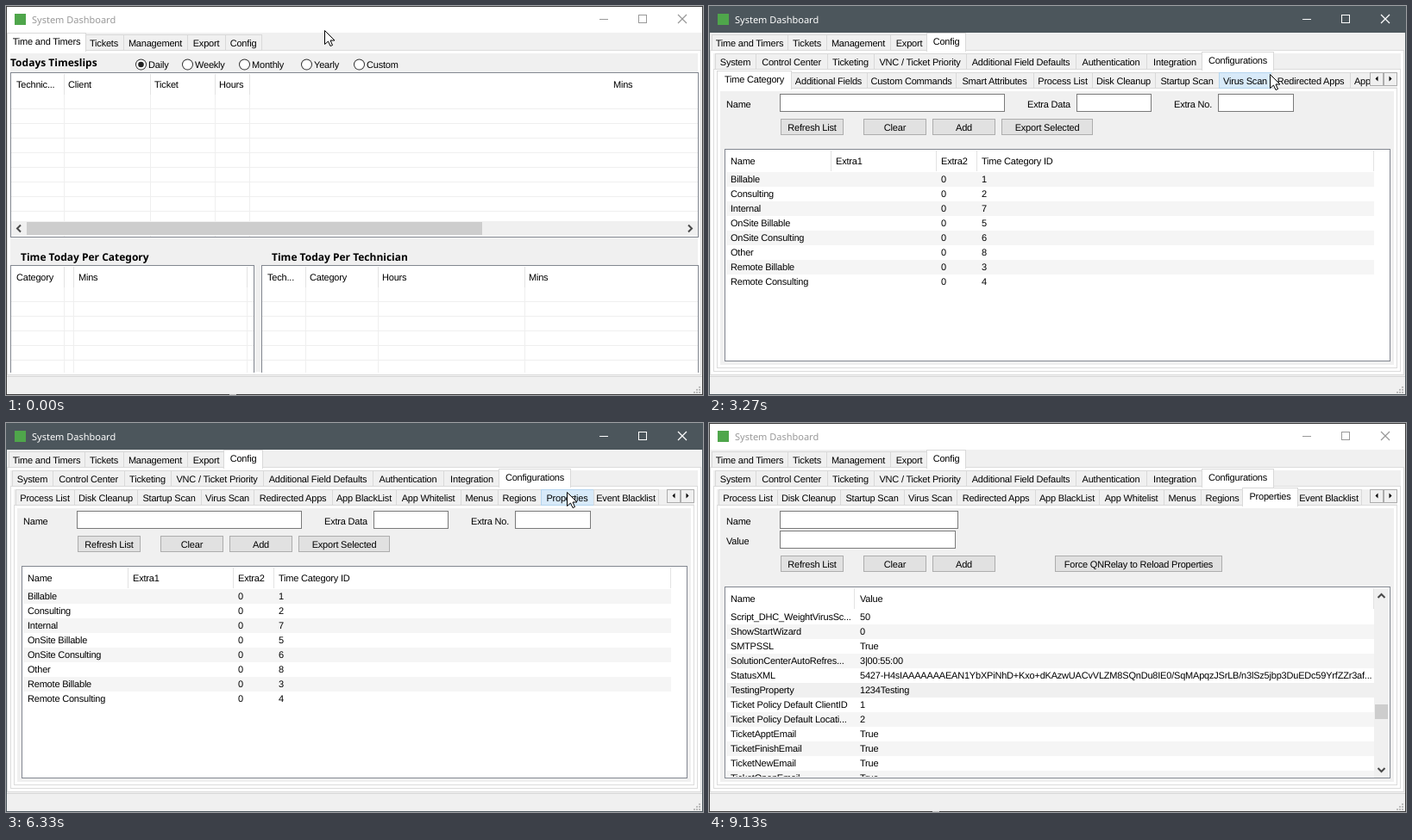
Write an HTML page with a canvas that moves like this. It is 808 px wide and 452 px high and loops after 9270 ms.

```html
<!DOCTYPE html>
<html lang="en">
<head>
<meta charset="utf-8">
<title>System Dashboard</title>
<style>
html, body { margin: 0; width: 100%; height: 100%; overflow: hidden; background: #f0f0f0; }
canvas { display: block; }
</style>
</head>
<body>
<canvas id="stage" width="808" height="452"></canvas>
<script>
const c = document.getElementById('stage').getContext('2d');
const LOOP = 9270, TICK = 200 / 3;
const FACE = '#f0f0f0', LINE = '#dcdcdc', FIELD = '#7a7a7a', LIST = '#828790';
const UI = '11px "Liberation Sans", Arial, sans-serif';
const HEAD = 'bold 12px "Noto Sans", sans-serif';
const GROUP = 'bold 13px "Liberation Sans", Arial, sans-serif';

// Pointer path: time, x, y
const PATH = [
  [0, 369, 28], [333, 279, 39], [1800, 279, 39], [2133, 550, 62], [2333, 615, 69],
  [3200, 615, 69], [3267, 650, 79], [3533, 765, 101], [3667, 765, 101], [3867, 762, 91],
  [4067, 790, 87], [5733, 790, 87], [6333, 650, 80], [7867, 650, 80], [7933, 586, 115],
  [8333, 330, 265], [8800, 86, 453]
];
const SCROLLS = [4333, 4667, 5000, 5333];

const MAIN = { y: 33, x: 3, names: ['Time and Timers', 'Tickets', 'Management', 'Export', 'Config'], w: [88, 45, 74, 44, 42] };
const SUB = {
  y: 55, x: 7,
  names: ['System', 'Control Center', 'Ticketing', 'VNC / Ticket Priority', 'Additional Field Defaults',
    'Authentication', 'Integration', 'Configurations'],
  w: [47, 83, 54, 107, 127, 82, 66, 80]
};
const CONF = {
  y: 77, x: 11,
  names: ['Time Category', 'Additional Fields', 'Custom Commands', 'Smart Attributes', 'Process List', 'Disk Cleanup',
    'Startup Scan', 'Virus Scan', 'Redirected Apps', 'App BlackList', 'App Whitelist', 'Menus', 'Regions',
    'Properties', 'Event Blacklist'],
  w: [83, 89, 103, 90, 68, 73, 74, 61, 91, 74, 75, 43, 50, 61, 75]
};
const CATEGORIES = [['Billable', 1], ['Consulting', 2], ['Internal', 7], ['OnSite Billable', 5],
  ['OnSite Consulting', 6], ['Other', 8], ['Remote Billable', 3], ['Remote Consulting', 4]];
const PROPS = [
  ['Script_DHC_WeightVirusSc...', '50'], ['ShowStartWizard', '0'], ['SMTPSSL', 'True'],
  ['SolutionCenterAutoRefres...', '3|00:55:00'],
  ['StatusXML', '5427-H4sIAAAAAAAEAN1YbXPiNhD+Kxo+dKAzwUACvVLZM8SQnDu8tIE0/SqMApqzJSrLB/n3lSz5jbp3DuEDc59YrfZZr3af...'],
  ['TestingProperty', '1234Testing'], ['Ticket Policy Default ClientID', '1'], ['Ticket Policy Default Locati...', '2'],
  ['TicketApptEmail', 'True'], ['TicketFinishEmail', 'True'], ['TicketNewEmail', 'True'], ['TicketOpenEmail', 'True']
];
PROPS[4][1] = '5427-H4sIAAAAAAAEAN1YbXPiNhD+Kxo+dKAzwUACvVLZM8SQnDu8tIE0/SqMApqzJSrLB/n3lSz5jbp3DuEDc59YrfZZr3af...'
  .slice(0, 53) + 'IE0/SqMApqzJSrLB/n3lSz5jbp3DuEDc59YrfZZr3af...';
// Label and checked state
const OPTIONS = [['Show Prompt for Zumline', 0], ['Auto Issue Zumline on Window Open', 1], ['Show Passwords', 0],
  ['Show Tool Tips', 0], ['Open ticket window on manual ticket creation', 1], ['Display save warnings when closing tickets', 1],
  ['Allow Save Password', 1], ['Do Not AutoUpdate', 0], ['Skip Web Checkup', 0], ['Reverse the save on close message', 1],
  ['Disable Timezone compensation in control center', 0], ['Use Server address for redirector', 1]];
const SWATCHES = [[138, '#4da6ff', 'Informational'], [163, '#80ff80', 'Warning'], [187, '#ff8080', 'Error'],
  [212, '#ffb366', 'Critical'], [265, '#33cc33', 'Monitor Success'], [291, '#ffb366', 'Monitor Warning'],
  [316, '#ff7373', 'Monitor Failure'], [368, '#ff4d4d', 'Ticket Overdue'], [394, '#ff4d4d', 'High Priority']];

let mouse = [0, 0];

function fill(l, t, r, b, color) {
  c.fillStyle = color;
  c.fillRect(l, t, r - l, b - t);
}
function box(l, t, r, b, inside, edge) {
  fill(l, t, r, b, edge);
  fill(l + 1, t + 1, r - 1, b - 1, inside);
}
function text(s, x, mid, { font = UI, color = '#000', align = 'left' } = {}) {
  c.font = font;
  c.letterSpacing = font === UI ? '-0.2px' : '0px';
  c.textAlign = align;
  c.fillStyle = color;
  c.fillText(s, x, mid + 4);
}
function stroke(points, color, width = 1) {
  c.beginPath();
  points.forEach(([x, y]) => c.lineTo(x, y));
  c.strokeStyle = color;
  c.lineWidth = width;
  c.stroke();
}
function disc(x, y, r, color) {
  c.beginPath();
  c.arc(x, y, r, 0, 7);
  c.fillStyle = color;
  c.fill();
}
function clipped(l, t, r, b, draw) {
  c.save();
  c.beginPath();
  c.rect(l, t, r - l, b - t);
  c.clip();
  draw();
  c.restore();
}
const over = (l, t, r, b) => mouse[0] >= l && mouse[0] < r && mouse[1] >= t && mouse[1] < b;

function page(l, t, r, b) {
  box(l, t, r, b, '#fff', LINE);
  fill(l + 4, t + 4, r - 4, b - 4, FACE);
}
function tabs({ x, y, names, w }, selected, first = 0, limit = 804) {
  clipped(0, y - 2, limit, y + 20, () => {
    let chosen = null;
    for (let i = first; i < names.length; i++) {
      const r = x + w[i];
      if (i === selected) chosen = [x, r, names[i]];
      else {
        const hot = over(x, y, Math.min(r, limit), y + 18);
        box(x, y, r + 1, y + 19, hot ? '#d8eaf9' : FACE, hot ? '#b5d5ee' : '#d9d9d9');
        text(names[i], (x + r) / 2, y + 10, { align: 'center' });
      }
      x = r;
    }
    if (chosen) {
      const [l, r, name] = chosen;
      box(l - 2, y - 2, r + 2, y + 20, '#fff', '#d9d9d9');
      fill(l - 1, y + 18, r + 1, y + 20, '#fff');
      text(name, (l + r) / 2, y + 8, { align: 'center' });
    }
  });
}
function button(s, l, t, r, b) {
  const hot = over(l, t, r, b);
  box(l, t, r, b, hot ? '#e5f1fb' : '#e1e1e1', hot ? '#0078d7' : '#adadad');
  text(s, (l + r) / 2, Math.ceil((t + b) / 2), { align: 'center' });
}
const field = (l, t, r, b) => box(l, t, r, b, '#fff', FIELD);

function chevron(x, y, dx, dy) {
  stroke([[x - 2 * dx - 4 * dy, y - 2 * dy - 4 * dx], [x + 2 * dx, y + 2 * dy],
    [x - 2 * dx + 4 * dy, y - 2 * dy + 4 * dx]], '#484848', 2);
}
function vScroll(l, t, b, top, end) {
  fill(l, t, l + 17, b, FACE);
  fill(l + 1, top, l + 16, end, '#cdcdcd');
  chevron(l + 8.5, t + 9, 0, -1);
  chevron(l + 8.5, b - 9, 0, 1);
}
function columns(cols, t) {
  for (const [s, x, sep] of cols) {
    if (s) text(s, x, t + 14);
    if (sep) fill(sep, t + 2, sep + 1, t + 26, '#e3e3e3');
  }
}
function emptyList(l, t, r, b, cols) {
  box(l, t, r, b, '#fff', LIST);
  clipped(l + 1, t + 1, r - 1, b - 1, () => {
    for (let y = t + 42; y < b; y += 17) fill(l + 1, y, r - 1, y + 1, '#efefef');
    for (const [, , sep] of cols) if (sep) fill(sep, t + 26, sep + 1, b, '#efefef');
    columns(cols, t);
  });
}
function striped(t, rows, shaded, cols, xs, selected = -1) {
  box(18, t, 790, 413, '#fff', LIST);
  columns(cols, t);
  clipped(19, t + 1, 789, 411, () => rows.forEach((row, i) => {
    const y = t + 35 + i * 17;
    if (i % 2 === shaded) fill(20, y - 8, 771, y + 9, i === selected ? FACE : '#f5f5f5');
    row.forEach((s, k) => text(s, xs[k], y));
  }));
}

function timePage() {
  text('Todays Timeslips', 5, 66, { font: HEAD });
  [['Daily', 156], ['Weekly', 210], ['Monthly', 276], ['Yearly', 348], ['Custom', 409]].forEach(([s, x], i) => {
    disc(x + .5, 68, 6.5, '#333');
    disc(x + .5, 68, 5.5, '#fff');
    if (!i) disc(x + .5, 68, 3.3, '#222');
    text(s, x + 9, 68);
  });
  emptyList(5, 77, 803, 269, [['Technic...', 12, 67], ['Client', 72, 167], ['Ticket', 172, 242], ['Hours', 247, 282], ['Mins', 704]]);
  fill(6, 250, 802, 267, FACE);
  fill(24, 251, 552, 266, '#cdcdcd');
  chevron(15, 258.5, -1, 0);
  chevron(793, 258.5, 1, 0);
  text('Time Today Per Category', 17, 292, { font: HEAD });
  text('Time Today Per Technician', 308, 292, { font: HEAD });
  clipped(0, 290, 808, 426, () => {
    emptyList(5, 301, 288, 440, [['Category', 12, 67], ['', 0, 78], ['Mins', 84, 279]]);
    emptyList(296, 301, 803, 440, [['Tech...', 303, 347], ['Category', 352, 431], ['Hours', 436, 601], ['Mins', 606]]);
  });
}

function groupBox(s, l, t, r) {
  c.strokeStyle = LINE;
  c.lineWidth = 1;
  c.strokeRect(l + .5, t + .5, r - l, 400);
  c.font = UI;
  fill(l + 6, t, l + 9 + c.measureText(s).width, t + 1, FACE);
  text(s, l + 8, t);
}
function checkbox(y, s, on) {
  box(462, y - 7, 475, y + 6, '#fff', '#333');
  if (on) stroke([[465, y - .5], [467.5, y + 2], [472.5, y - 3.5]], '#222', 1.4);
  text(s, 492, y);
}
function swatch(l, t, color) {
  fill(l, t, l + 13, t + 13, '#fff');
  fill(l, t, l + 12, t + 12, '#a0a0a0');
  fill(l + 1, t + 1, l + 12, t + 12, '#e3e3e3');
  fill(l + 1, t + 1, l + 11, t + 11, '#333');
  fill(l + 2, t + 2, l + 11, t + 11, color);
}
function colorGroup() {
  groupBox('Colors', 14, 87, 428);
  [['Alerts', 102], ['Monitors', 230], ['Tickets', 333]].forEach(([s, y]) => {
    fill(22, y, 200, y + 19, '#fff');
    fill(22, y, 199, y + 18, '#a0a0a0');
    fill(23, y + 1, 199, y + 18, FACE);
    text(s, 26, y + 11, { font: GROUP });
  });
  for (const [y, color, s] of SWATCHES) {
    swatch(22, y - 6, color);
    text(s, 50, y);
  }
}
function brandGroup() {
  groupBox('Branding Options', 205, 104, 427);
  [['Title', 126], ['Popup Message', 148], ['Title Bar Icon', 169], ['Splash Picture', 186], ['Control Center Logo', 259]]
    .forEach(([s, y]) => text(s, 210, y));
  field(308, 114, 423, 135);
  text('Qorbel Technologies', 311, 124);
  field(308, 136, 423, 157);
  clipped(309, 137, 422, 156, () => text('Authorized Qorbel Employees', 311, 146));
  disc(355, 169, 9, '#1b6fb5');
  button('Load', 372, 159, 422, 178);
  for (const y of [180, 253]) {
    button('Load', 320, y, 370, y + 21);
    button('Clear', 372, y, 422, y + 21);
  }
  const logo = '11px "Liberation Sans", sans-serif';
  fill(314, 206, 420, 248, '#202124');
  disc(326, 227, 8, '#1b6fb5');
  text('QORBEL', 337, 227, { font: logo, color: '#245f9c' });
  text('TECH', 418, 227, { font: logo, color: '#a83c30', align: 'right' });
  fill(333, 284, 421, 332, '#202124');
  disc(377, 308, 21, '#1b6fb5');
  text('Min: 88 x 48 px', 419, 357, { align: 'right' });
  text('Max: 192 x 48 px', 419, 372, { align: 'right' });
  text('Max File Size: 64 Kb', 419, 387, { align: 'right' });
}
function controlPage() {
  clipped(9, 78, 799, 392, () => {
    colorGroup();
    brandGroup();
    groupBox('System Options', 454, 87, 775);
    OPTIONS.forEach(([s, on], i) => checkbox(113 + 21 * i, s, on));
    text('Redirector Connection Default Reason', 464, 366);
    field(662, 354, 769, 375);
    checkbox(388, 'Open webpage on Startup', 1);
    vScroll(429, 80, 392, 97, 261);
    vScroll(777, 80, 392, 97, 261);
  });
  box(721, 400, 794, 419, '#cccccc', '#bfbfbf');
  text('Save', 757, 410, { color: '#838383', align: 'center' });
}

function commonButtons(t) {
  button('Refresh List', 83, t, 156, t + 19);
  button('Clear', 179, t, 252, t + 19);
  button('Add', 259, t, 332, t + 19);
}
function categoryPage() {
  text('Name', 20, 114);
  field(82, 102, 343, 123);
  text('Extra Data', 369, 114);
  field(426, 102, 513, 123);
  text('Extra No.', 539, 114);
  field(590, 102, 678, 123);
  commonButtons(131);
  button('Export Selected', 339, 131, 445, 150);
  striped(166, CATEGORIES.map(([s, id]) => [s, '0', id]), 0,
    [['Name', 25, 141], ['Extra1', 147, 263], ['Extra2', 269, 310], ['Time Category ID', 316, 770]], [25, 269, 316]);
}
function propertyPage() {
  text('Name', 20, 114);
  field(82, 102, 289, 123);
  text('Value', 20, 137);
  field(82, 125, 286, 146);
  commonButtons(154);
  button('Force QNRelay to Reload Properties', 401, 154, 595, 173);
  striped(190, PROPS, 1, [['Name', 25, 168], ['Value', 175, 770]], [25, 175], 5);
  vScroll(771, 192, 412, 327, 344);
}

function spinner(l, dir, pressed) {
  const hot = over(l, 77, l + 16, 93);
  box(l, 77, l + 16, 93, pressed ? '#cce4f7' : hot ? '#e5f1fb' : FACE, pressed ? '#005499' : hot ? '#0078d7' : '#adadad');
  c.beginPath();
  c.moveTo(l + 8 - 1.5 * dir, 81.5);
  c.lineTo(l + 8 + 1.5 * dir, 84.5);
  c.lineTo(l + 8 - 1.5 * dir, 87.5);
  c.fillStyle = '#000';
  c.fill();
}
function configPage(t) {
  const inConf = t >= 2460;
  page(5, 73, 802, 425);
  tabs(SUB, inConf ? 7 : 1);
  if (!inConf) {
    if (t >= 1260) controlPage();
    return;
  }
  if (t < 2530) return;
  const props = t >= 6590;
  const first = SCROLLS.filter(s => t >= s - 5).length;
  page(9, 95, 798, 421);
  tabs(CONF, props ? 13 : 0, first, 766);
  spinner(766, -1, false);
  spinner(782, 1, SCROLLS.some(s => t > s - 70 && t < s + 65));
  props ? propertyPage() : categoryPage();
}

function frame(active) {
  const dark = '#4c565c', ink = active ? '#fff' : '#999';
  fill(0, 0, 808, 452, active ? dark : '#3c3c3c');
  fill(1, 1, 807, 31, active ? dark : '#fff');
  fill(1, 31, 807, 451, FACE);
  if (!active) fill(259, 451, 267, 452, '#bbb');
  fill(10, 9, 23, 22, '#4fa64b');
  text('System Dashboard', 30, 16, { font: '11px "Noto Sans", sans-serif', color: ink });
  fill(688, 15, 698, 16, ink);
  c.strokeStyle = ink;
  c.lineWidth = 1;
  c.strokeRect(733.5, 10.5, 9, 9);
  stroke([[779, 10], [789, 20]], ink, 1.2);
  stroke([[789, 10], [779, 20]], ink, 1.2);
  fill(1, 430, 807, 431, '#d7d7d7');
  for (let i = 0; i < 3; i++)
    for (let j = 0; j <= i; j++) fill(803 - 3 * j, 442 + 3 * i, 805 - 3 * j, 444 + 3 * i, '#bcbcbc');
}
function pointerAt(t) {
  const i = PATH.findIndex(p => p[0] > t);
  if (i < 0) return PATH[PATH.length - 1].slice(1);
  const [a, ax, ay] = PATH[i - 1], [b, bx, by] = PATH[i], u = (t - a) / (b - a);
  return [Math.round(ax + (bx - ax) * u), Math.round(ay + (by - ay) * u)];
}
function pointer([x, y]) {
  c.beginPath();
  [[0, 0], [0, 16], [4, 12.5], [6.5, 18], [9, 17], [6.5, 11.5], [11.5, 11.5]]
    .forEach(([dx, dy]) => c.lineTo(x + dx + .5, y + dy + .5));
  c.closePath();
  c.fillStyle = '#fff';
  c.fill();
  c.strokeStyle = '#000';
  c.lineWidth = 1;
  c.stroke();
}

function draw(now) {
  const t = Math.floor((now % LOOP + 4) / TICK) * TICK;
  const config = t >= 990;
  mouse = pointerAt(t);
  frame(t >= 930 && t < 9130);
  page(1, 51, 806, 429);
  tabs(MAIN, config ? 4 : 0);
  config ? configPage(t) : timePage();
  if (t < 8795) pointer(mouse);
}

c.textRendering = 'geometricPrecision';
const start = performance.now();
(function tick() {
  draw(performance.now() - start);
  requestAnimationFrame(tick);
})();
</script>
</body>
</html>
```
